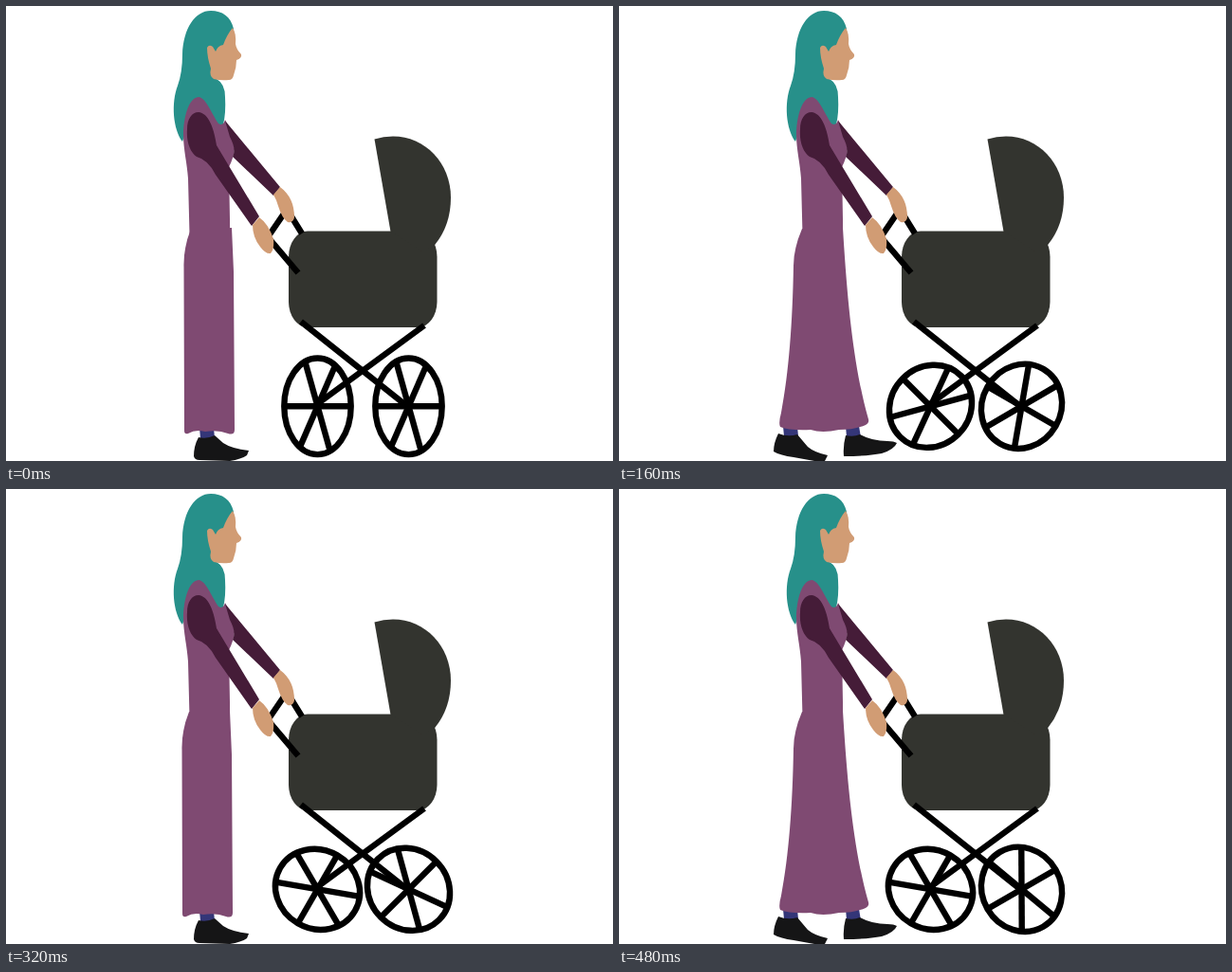
Animation, 640 px wide and 480 px high, one loop 640 ms. Source, as an HTML page:

```html
<!DOCTYPE html>
<html lang="en">
<head>
<meta charset="utf-8">
<title>Walk with a pram</title>
<style>
  html, body { margin: 0; width: 100%; height: 100%; overflow: hidden; background: #fff; }
  svg { display: block; width: 100%; height: 100%; }
  .teal { fill: #27908a; }
  .dress { fill: #7f4a72; }
  .sleeve { fill: #451c38; }
  .skin { fill: #d19c74; }
  .pram { fill: #33342f; }
  .shoe { fill: #151516; }
  .sock { fill: #343678; }
  .bar { fill: none; stroke: #000; stroke-width: 6.4; vector-effect: non-scaling-stroke; }
</style>
</head>
<body>
<svg viewBox="0 0 640 480">
  <defs>
    <!-- unit wheel, shaped and turned by the script -->
    <g id="wheel">
      <circle class="bar" r="1"/>
      <path class="bar" d="M-1 0H1"/>
      <path class="bar" d="M-1 0H1" transform="rotate(68)"/>
      <path class="bar" d="M-1 0H1" transform="rotate(122)"/>
    </g>
  </defs>

  <!-- legs and skirt -->
  <g id="together">
    <path class="sock" d="M204 445H219L220 456H205Z"/>
    <path class="shoe" d="M203 455Q198 464 198 475Q199 479 204 479L236 480Q248 478 254 474L256 469Q238 467 229 461L220 453Q212 457 203 455Z"/>
    <path id="skirt" class="dress" d="M193 235Q185 255 185.500 275L186 448Q186 452 190 451Q198 446 208 449Q222 447 232 451Q239 453 239 447L238 280L236 234Z"/>
  </g>
  <g id="apart">
    <path class="sock" d="M173 443H188L189 454H174ZM239 443H253L255 455H240Z"/>
    <path class="shoe" d="M168 451Q163 461 163 470Q170 474 184 476L206 480H217L220 474Q206 471 199 465L188 452Q178 455 168 451ZM239 453Q236 464 237 475Q262 475 277 472Q290 468 293 461Q290 459 283 459Q267 459 254 452Q247 455 239 453Z"/>
    <path class="dress" d="M193 235Q184 256 184 274C183 335 179 387 171 429Q168 440 170 444Q180 448 202 447Q214 451 232 447Q248 447 260 442Q264 440 263 436C248 383 241 318 236 234Z"/>
  </g>

  <!-- head and body -->
  <path class="teal" d="M216 5C228 5 237 11 240 24L238 60L222 77Q231 82 231 96Q232 113 229 125H218L195 118L186 143C176 130 174 102 181 84Q186 70 186 51C187 24 199 5 216 5Z"/>
  <path class="skin" d="M239 23Q243 29 242 40Q243 46 248 51Q249 55 243 57Q243 65 240 73Q239 78 235 78Q227 79 219 77Q214 74 216 66Q212 54 212 44Q214 40 218 43L221 48Q223 42 229 41Q233 30 239 23Z"/>
  <path class="dress" d="M203 96C211 97 216 112 224 124Q229 127 231 120Q239 134 241 151Q240 160 235 170L236 225V241H193.500L192 182C191 166 187 151 187 136C187 119 192 97 203 96Z"/>
  <path class="sleeve" d="M231 121L289 191L282 200L239 159Q243 151 236 138Z"/>

  <!-- pram -->
  <rect class="pram" x="298" y="237.500" width="156.500" height="101.500" rx="20" ry="27"/>
  <path class="pram" d="M388.500 140.500Q398 137.500 408 137.500C442 137.500 469 166 469 202Q469 231 452.500 251.500L440 260L405.500 238Z"/>
  <path class="bar" d="M278 241L293 219M299 219L312 240M278 246L308 281.500"/>
  <path class="sleeve" d="M203 112C213 113 219 127 222 147L267 222L259 232L221 178Q213 162 201 159C194 154 190 143 191 130C191 119 196 112 203 112Z"/>
  <path class="skin" d="M289 191L282 199Q285 204 287 211Q291 224 297 228Q303 229 304 223Q304 202 289 191ZM267 223L260 231Q260 244 268 254Q274 262 279 261Q283 257 282 246Q277 230 267 223Z"/>
  <path class="bar" d="M311 333L424 423M441 337L328 420"/>
  <use id="rear" href="#wheel"/>
  <use id="front" href="#wheel"/>
</svg>
<script>
const STEP = 160;
const TURNS = { rear: [0, 45, -60, -60], front: [0, 30, -45, -30] };
const HUB_X = { rear: 328.5, front: 424.5 };

const $ = id => document.getElementById(id);
const show = (id, on) => $(id).setAttribute('visibility', on ? 'visible' : 'hidden');

function draw(now) {
  const pose = Math.floor(now / STEP) % 4;
  const wide = pose % 2 === 1;
  show('apart', wide);
  show('together', !wide);
  $('skirt').setAttribute('transform', `translate(${pose ? 0 : 2} 0)`);

  // The wheels are tall ovals at rest and nearly round while turning
  const size = pose ? '41.5 45.5' : '35.2 50.8';
  for (const id in TURNS) {
    $(id).setAttribute('transform',
      `translate(${HUB_X[id]} 422.3) rotate(${TURNS[id][pose]}) scale(${size})`);
  }
}

const start = performance.now();
function tick() {
  draw(performance.now() - start);
  requestAnimationFrame(tick);
}
tick();
</script>
</body>
</html>
```
